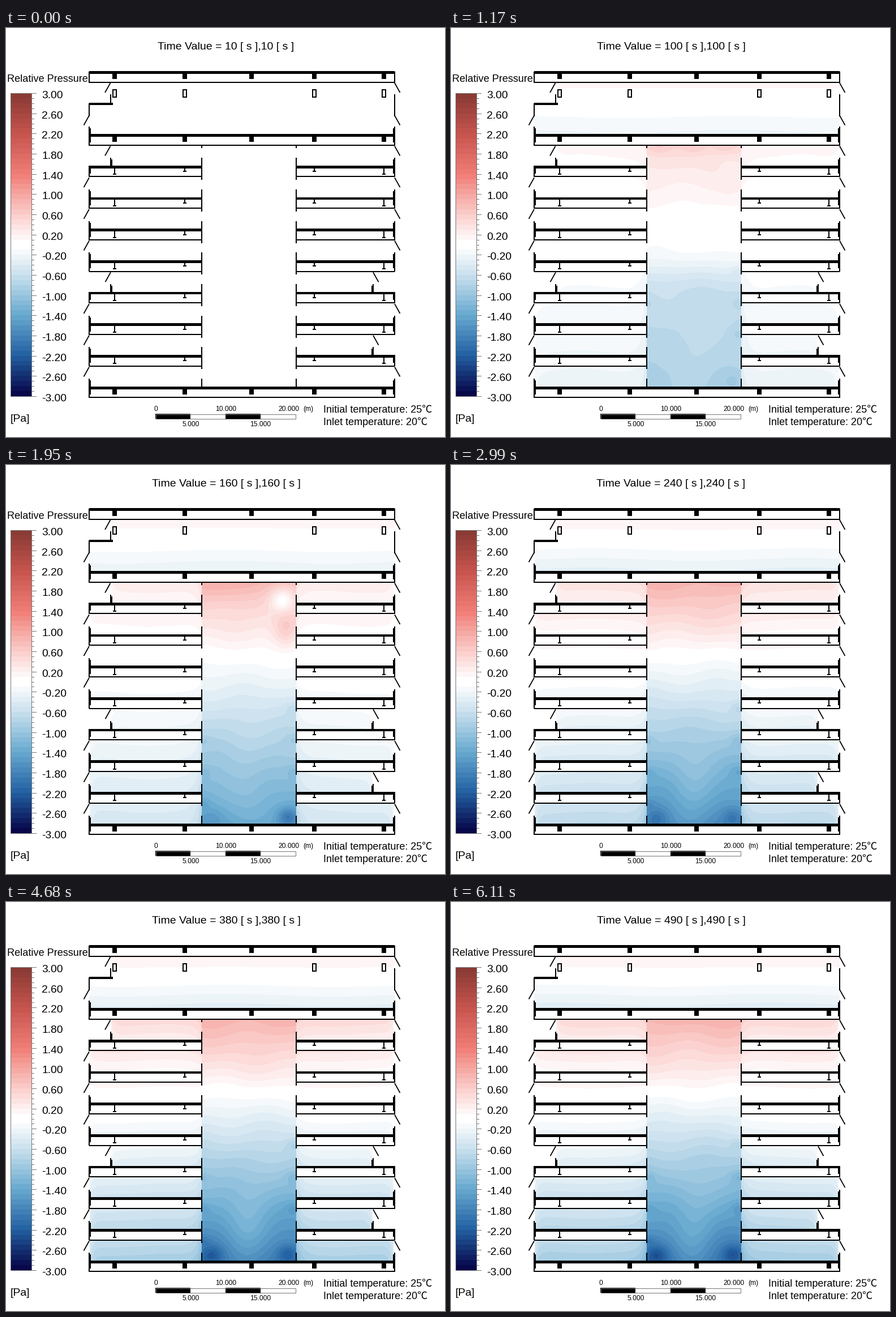
Write a matplotlib script that moves like this. It is 776x722 px and loops after 6240 ms.

```python
import numpy as np
import matplotlib.pyplot as plt
from matplotlib.animation import FuncAnimation
from matplotlib.colors import LinearSegmentedColormap
from matplotlib.patches import Rectangle

W, H, DPI = 776, 722, 100
PX = 72 / DPI
FRAMES, INTERVAL = 48, 130

plt.rcParams["font.family"] = ["Liberation Sans", "Noto Sans CJK JP"]
fig = plt.figure(figsize=(W / DPI, H / DPI), dpi=DPI, facecolor="white")
ax = fig.add_axes([0, 0, 1, 1])
ax.axis("off")

STOPS = [(-3, "#07074a"), (-2.2, "#2463a4"), (-1.4, "#6aabd1"), (-0.6, "#cbe1ee"),
         (-0.06, "#ffffff"), (0.06, "#ffffff"),
         (0.6, "#fbcfcc"), (1.4, "#f17f78"), (2.2, "#c9554f"), (3, "#8a3b35")]
cmap = LinearSegmentedColormap.from_list("pressure", [((v + 3) / 6, c) for v, c in STOPS], N=60)

# ---- layout ----
X0, X1 = 147, 687
LEFT, RIGHT = 346, 513
ROOF, DECK, STEP = 78.5, 189.5, 55.7
GROUND = DECK + 8 * STEP
THICK = 17
COLUMNS = (192, 316, 433.5, 545, 668)

# ---- pressure field ----
x, y = np.meshgrid(np.arange(X0, X1) + 0.5, np.arange(96, 635) + 0.5)
in_shaft = (x > LEFT) & (x < RIGHT) & (y > 207)
in_attic = (y < DECK) & ((x > 185) | (y > 133))

room = np.floor((y - DECK) / STEP)
frac = ((y - DECK) % STEP - THICK) / (STEP - THICK)
room_left = np.where((room == 0) | (room == 4), 186, 148)
room_right = np.where((room == 4) | (room == 6), 648, 685)
in_room = (room >= 0) & (frac > 0) & (x > room_left) & (x < room_right) & ~in_shaft
room_base = 0.5 - 0.165 * room - 0.27 * frac
room_base *= 1 - 0.4 * np.exp(-np.abs(np.minimum(x - room_left, room_right - x)) / 5)
gap = np.maximum(np.maximum(LEFT - x, x - RIGHT), 0)
bleed = 0.3 * np.exp(-gap / 9)

hot = np.clip((335 - y) / 127, 0, 1) ** 0.85
cold = np.clip((y - 335) / 298, 0, 1) ** 0.95
ramp = np.clip((y - 385) / 85, 0, 1)
plateau = 0.6 * ramp * ramp * (3 - 2 * ramp)


def blob(cx, cy, rx, ry):
    return np.exp(-((x - cx) / rx) ** 2 - ((y - cy) / ry) ** 2)


def rise(i, tau, power=1):
    return 1 - np.exp(-(i / tau) ** power)


def pulse(i, center, width):
    return np.exp(-((i - center) / width) ** 2)


jets = sum(blob(LEFT, DECK + k * STEP + 18, 15, 9) + blob(RIGHT - 5, DECK + k * STEP - 39, 14, 11)
           for k in (5, 6, 7))
corners = blob(364, 622, 20, 17) + blob(498, 621, 18, 16)
hot_spots = sum(blob(cx, 208, 24, 15) for cx in (365, 430, 485))
swirl = 0.2 * blob(385, 208, 55, 30) - 0.55 * blob(489, 238, 22, 22) \
    + 0.32 * blob(494, 290, 22, 32) - 0.35 * blob(498, 621, 18, 16)
plume = np.exp(-((x - 428) / 38) ** 2) * np.clip((y - 450) / 130, 0, 1)


def field(i):
    grow = rise(i, 9)
    early = np.exp(-(i / 11) ** 4)

    shaft = 0.85 * rise(i, 11, 2) * hot
    shaft -= 2 * rise(i, 11) * (cold * (1 - early) + plateau * early)
    shaft += 0.022 * grow * (np.sin(x / 17 + y / 38 + i * 0.5) + np.sin(x / 29 - y / 23 - i * 0.37))
    shaft += 0.28 * rise(i, 18, 2) * plume
    shaft -= 0.16 * grow * jets + 0.4 * rise(i, 22, 2) * corners
    shaft += 0.18 * pulse(i, 9, 4) * hot_spots + pulse(i, 15, 4) * swirl

    rooms = room_base * rise(i, 18, 1.6)
    rooms += 0.012 * grow * np.sin(x / 31 + i * 0.4)
    rooms += (shaft - rooms) * bleed

    depth = (y - 96) / 92
    attic = grow * (0.22 - 0.57 * depth + 0.02 * depth * np.sin(x / 60 + i * 0.3))
    return np.select([in_shaft, in_room, in_attic], [shaft, rooms, attic], 0)


image = ax.imshow(field(0), cmap=cmap, vmin=-3, vmax=3, extent=(X0, X1, 635, 96),
                  interpolation="nearest", aspect="auto", zorder=1)


# ---- drawing helpers ----
def box(x0, y0, x1, y1, color="black", z=3):
    ax.add_patch(Rectangle((x0, y0), x1 - x0, y1 - y0, fc=color, ec="none", lw=0, zorder=z))


def outline(x0, y0, x1, y1, width=1, color="black"):
    ax.add_patch(Rectangle((x0, y0), x1 - x0, y1 - y0, fill=False, ec=color,
                           lw=width * PX, zorder=4))


def wall(px, y0, y1):
    box(px - 1, y0, px + 1, y1)


def vane(px, py, side):
    ax.plot([px, px + 9.5 * side], [py, py + 17], color="black", lw=1.8 * PX,
            solid_capstyle="butt", zorder=3)


def label(px, py, text, size, ha="left"):
    return ax.text(px, py, text, fontsize=size * PX, ha=ha, va="baseline", zorder=5)


def slab(x0, x1, top):
    box(x0, top + 2, x1, top + THICK, "white", 2)
    box(x0, top - 2.3, x1, top + 2.4)
    box(x0, top + THICK - 0.8, x1, top + THICK + 1.2)


def sill(px, top, inset=False):
    """Outer edge of a floor: thin wall plus a thick parapet."""
    inner = 1 if px < W / 2 else -1
    up = 2 if inset else 16
    wall(px, top - up, top + THICK + 1)
    a, b = sorted((px - inner, px + 3 * inner))
    box(a, top - min(up, 13), b, top + 12)


def parapet(px, top, side):
    wall(px, top - 16, top)
    a, b = sorted((px - side, px + 3 * side))
    box(a, top - 13, b, top)


def hanger(px, top, drop):
    wall(px, top, top + drop)
    box(px - 3, top + drop - 1, px + 3, top + drop + 1)


# ---- building ----
for top in (ROOF, DECK, GROUND):
    slab(X0, X1, top)
    for c in COLUMNS:
        box(c - 4, top + 1, c + 4, top + 11.5)
for px in (X0, X1):
    wall(px, ROOF - 2, ROOF + THICK + 1)
    sill(px, DECK)
    sill(px, GROUND)

for c in COLUMNS:
    if c != 433.5:
        outline(c - 3, 109, c + 3, 121.5, 2)
wall(185, 117, 133)
box(X0, 131.5, 189, 135.5)
wall(X0, 133, 156)
wall(X1, 117, 156)
for py in (97, 208.5):
    vane(184.5, py, -1)
    vane(X1, py, 1)
vane(X0, 154.5, -1)
vane(X1, 154.5, 1)

for px in (LEFT, RIGHT):
    wall(px, 207, 212)
    wall(px, GROUND - 16, GROUND)

for k in range(7):
    top = DECK + STEP * (k + 1)
    low = top + THICK
    slab(X0, LEFT, top)
    slab(RIGHT, X1, top)
    for px in (LEFT, RIGHT):
        wall(px, top - 16, low + 6)
    for c in COLUMNS:
        if c != 433.5:
            hanger(c, top, 13 if c in (192, 668) else 8)

    inset_l, inset_r = k in (0, 4), k in (4, 6)
    sill(X0, top, inset_l)
    sill(X1, top, inset_r)
    if inset_l:
        parapet(185, top, 1)
    if inset_r:
        parapet(649, top, -1)
    vane(185 if k == 3 else X0, low + 2, -1)
    vane(649 if k in (3, 5) else X1, low + 2, 1)

# ---- colour bar ----
GREY = "#777777"
ax.imshow(np.linspace(2.95, -2.95, 60)[:, None], cmap=cmap, vmin=-3, vmax=3,
          extent=(8, 45, 650, 115), interpolation="nearest", aspect="auto", zorder=2)
outline(7.5, 115, 45, 650, 1, GREY)
for n in range(61):
    py = 115 + n * 535 / 60
    major = n % 4 == 0
    ax.plot([45, 53 if major else 49], [py, py], color=GREY, lw=PX, zorder=3)
    if major:
        label(63.5, py + 9, f"{3 - n / 10:.2f}", 19.3)
label(2, 95, "Relative Pressure", 18.1)
label(7.5, 695, "[Pa]", 19.4)

# ---- scale and notes ----
for n in range(4):
    box(264 + 62 * n, 681, 326 + 62 * n, 690, "white" if n % 2 else "black")
outline(264.5, 681.5, 512, 689.5, 1, GREY)
for px, py, text in ((264.5, 676, "0"), (389, 676, "10.000"), (499.5, 676, "20.000"),
                     (534, 676, "(m)"), (327, 703, "5.000"), (450, 703, "15.000")):
    label(px, py, text, 12, "center")
label(561, 679, "Initial temperature: 25℃", 18)
label(561, 701, "Inlet temperature: 20℃", 18)
title = label(389, 37.5, "", 19.5, "center")

ax.set_xlim(0, W)
ax.set_ylim(H, 0)


def update(i):
    sec = 10 * (i + 1 + (i > 25))
    title.set_text(f"Time Value = {sec} [ s ],{sec} [ s ]")
    image.set_data(field(i))
    return image, title


anim = FuncAnimation(fig, update, frames=FRAMES, interval=INTERVAL, repeat=True, repeat_delay=0)
plt.show()
```
